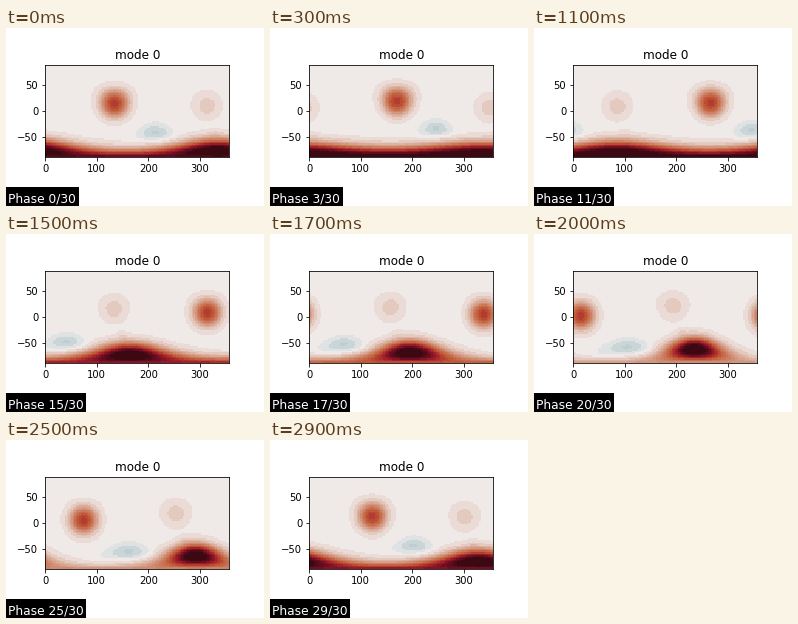
Write a matplotlib script that moves like this. It is 258 px wide and 178 px high and loops after 3000 ms.

```python
import numpy as np
import matplotlib.pyplot as plt
from matplotlib.animation import FuncAnimation
from matplotlib.colors import LinearSegmentedColormap
from matplotlib.patches import Rectangle

W, H, DPI = 258, 178, 72
FRAMES = 30

plt.rcParams["font.family"] = "DejaVu Sans"

cmap = LinearSegmentedColormap.from_list("diverging", [
    (0.00, "#181c43"), (0.20, "#0c5ebe"), (0.30, "#75aabe"),
    (0.40, "#bfced2"), (0.45, "#dbe1e2"), (0.50, "#f0ebe9"),
    (0.54, "#ecdcd7"), (0.60, "#e0bfb3"), (0.70, "#d18d73"),
    (0.80, "#c05a37"), (0.88, "#a6222a"), (0.94, "#730e24"),
    (1.00, "#3c0912")], N=512)

lon, lat = np.meshgrid(np.arange(1.5, 357, 3), np.arange(-88.5, 90, 3))


def cosd(a):
    return np.cos(np.radians(a))


def sind(a):
    return np.sin(np.radians(a))


def distance(lon0, lat0):
    """Great-circle distance in degrees from every cell to a point."""
    c = sind(lat) * sind(lat0) + cosd(lat) * cosd(lat0) * cosd(lon - lon0)
    return np.degrees(np.arccos(np.clip(c, -1, 1)))


def spot(lon0, lat0, amp, width, power=2):
    return amp * np.exp(-(distance(lon0, lat0) / width) ** power)


def oval(lon0, lat0, amp, wx, wy):
    dx = ((lon - lon0 + 180) % 360 - 180) * cosd(lat)
    return amp * np.exp(-0.5 * ((dx / wx) ** 2 + ((lat - lat0) / wy) ** 2))


# Path of the polar spot: (step, distance from the south pole, longitude),
# smoothed by a few harmonics in the plane around the pole.
keys = np.array([(0, 11, 335), (7, 4, 0), (11, 6, 85), (15, 15, 160),
                 (20, 27, 236), (25, 24, 294), (29, 14, 325)])
orders = np.array([-1, 0, 1, 2])


def harmonics(step):
    return np.exp(2j * np.pi * np.outer(step, orders) / FRAMES)


coef = np.linalg.lstsq(harmonics(keys[:, 0]),
                       keys[:, 1] * np.exp(1j * np.radians(keys[:, 2])),
                       rcond=None)[0]


def polar_spot(step):
    p = (harmonics([step]) @ coef)[0]
    return spot(np.degrees(np.angle(p)), abs(p) - 90, 1.1, 25, 2.2)


def field(step):
    turn = 360 * step / FRAMES
    total = polar_spot(step)
    strong, faint = 135 + turn, 314 + turn
    total += spot(strong, 10.5 + 9 * cosd(strong - 205), 0.69, 28, 2.3)
    total += spot(faint, 12 + 8 * cosd(faint - 205), 0.17, 25.5)
    total += spot(330 + turn, -40 + 10 * cosd(turn - 250), 0.05, 8)
    total += oval(218 + turn + 9 * cosd(turn - 245),
                  -46 + 14 * cosd(turn - 75), -0.22, 15.5, 11)
    # coarse bands in the pale tones, finer ones in the strong tones
    band = np.where(np.abs(total) < 0.2, 0.08, 0.04)
    return np.round(total / band) * band


fig = plt.figure(figsize=(W / DPI, H / DPI), dpi=DPI, facecolor="white")
ax = fig.add_axes([39.2 / W, (H - 129.2) / H, 184 / W, 92.6 / H])
image = ax.imshow(field(0), cmap=cmap, vmin=-1, vmax=1, origin="lower",
                  extent=(0, 357, -90, 90), aspect="auto",
                  interpolation="nearest")
ax.set_xticks([0, 100, 200, 300])
ax.set_yticks([-50, 0, 50])
ax.tick_params(labelsize=10)
ax.set_title("mode 0", fontsize=12)

box = Rectangle((0, 0), 73, 19, color="black", lw=0, transform=None)
fig.add_artist(box)
label = fig.text(2 / W, 4 / H, "", color="white", fontsize=12.3,
                 va="baseline")


def update(step):
    image.set_data(field(step))
    label.set_text(f"Phase {step}/{FRAMES}")
    box.set_width(73 if step < 10 else 80)
    return image, label, box


anim = FuncAnimation(fig, update, frames=FRAMES, interval=100, repeat=True)
plt.show()
```
